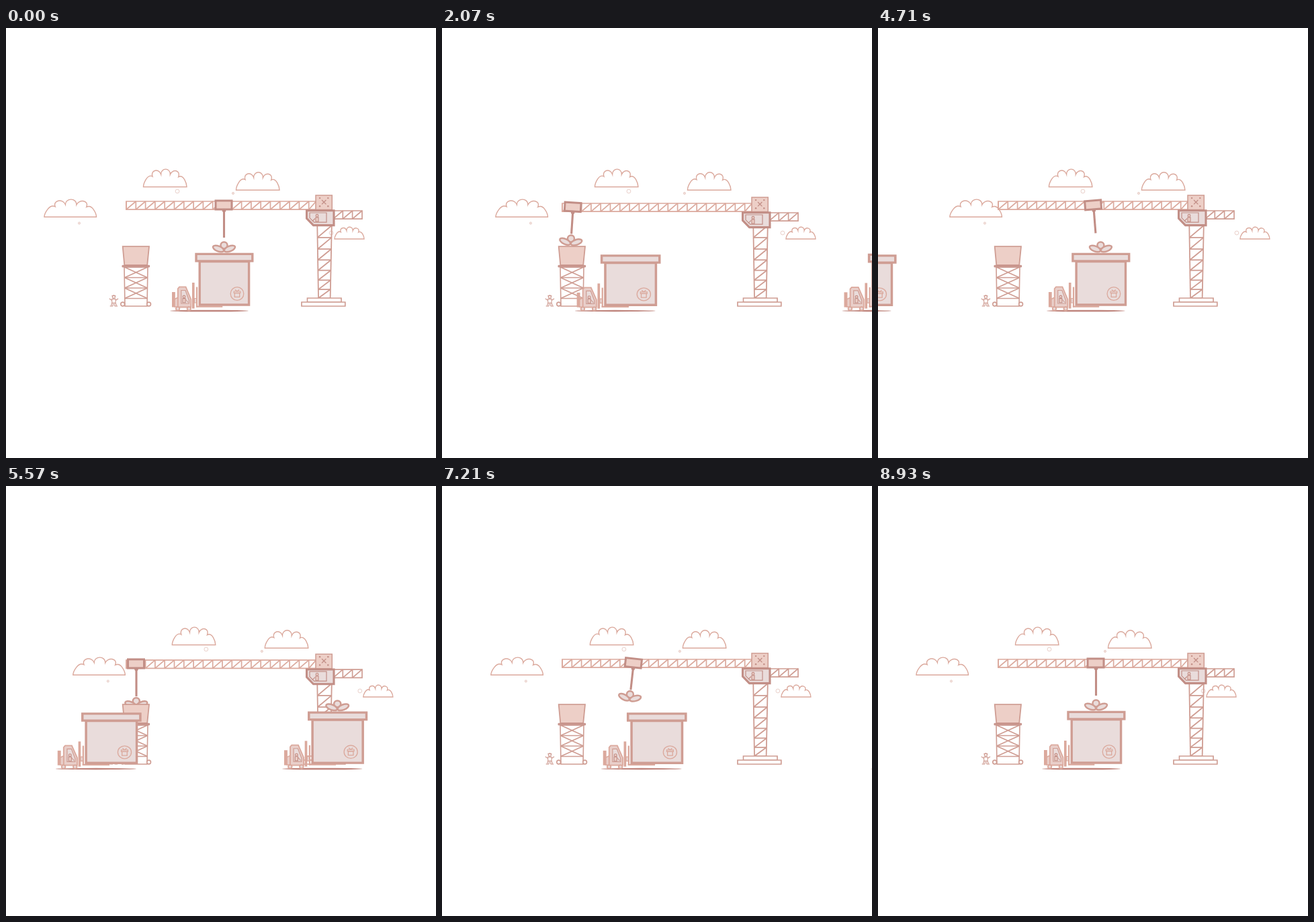
Animation, 640 px wide and 640 px high, one loop 9 s. Source, as an HTML page with a canvas:

```html
<!DOCTYPE html>
<html lang="en">
<head>
<meta charset="utf-8">
<title>Gift crane</title>
<style>
html, body { margin: 0; width: 100%; height: 100%; overflow: hidden; background: #fff; }
canvas { display: block; width: 100vmin; height: 100vmin; }
</style>
</head>
<body>
<canvas id="stage"></canvas>
<script>
const canvas = document.getElementById('stage');
const ctx = canvas.getContext('2d');

const LOOP = 9000, FPS = 14, CYCLE = 4476;
const HOME = 302.5, GROUND = 421, TRAVEL = 402;
const PICKUP = 193.5, DROP = 324, BOW_REST = 323.5, RELEASE = 3950;
const LIGHT = '#dba99d', MID = '#cf9d93', DARK = '#c28e86';
const PINK = '#edcfc7', PALE = '#e9dcdb';

// ---------- helpers ----------
const clamp = v => Math.max(0, Math.min(1, v));
const unit = (t, from, to) => clamp((t - from) / (to - from));
const ramp = (t, from, to) => (1 - Math.cos(Math.PI * unit(t, from, to))) / 2;
const mix = (a, b, u) => a + (b - a) * u;

// Symmetric cubic-bezier easing with handles at .35
function glide(u) {
  let lo = 0, hi = 1;
  for (let i = 0; i < 24; i++) {
    const s = (lo + hi) / 2, r = 1 - s;
    if (1.05 * s * r + s * s * s < u) lo = s; else hi = s;
  }
  return lo * lo * (3 - 2 * lo);
}

function paint(stroke, width, fill) {
  if (fill) { ctx.fillStyle = fill; ctx.fill(); }
  if (stroke) { ctx.strokeStyle = stroke; ctx.lineWidth = width; ctx.stroke(); }
}
function poly(points, stroke, width, fill) {
  ctx.beginPath();
  for (const [x, y] of points) ctx.lineTo(x, y);
  ctx.closePath();
  paint(stroke, width, fill);
}
function line(x1, y1, x2, y2, stroke, width) {
  ctx.beginPath();
  ctx.moveTo(x1, y1);
  ctx.lineTo(x2, y2);
  paint(stroke, width);
}
function box(x, y, w, h, stroke, width, fill) {
  ctx.beginPath();
  ctx.rect(x, y, w, h);
  paint(stroke, width, fill);
}
function dot(x, y, r, stroke, width, fill) {
  ctx.beginPath();
  ctx.arc(x, y, r, 0, 7);
  paint(stroke, width, fill);
}
function oval(x, y, rx, ry, turn, stroke, width, fill) {
  ctx.beginPath();
  ctx.ellipse(x, y, rx, ry, turn, 0, 7);
  paint(stroke, width, fill);
}

// ---------- scenery ----------
// Scallops between valleys that sit on a half ellipse
function cloud(x, base, w, h) {
  const point = (u, v) => [x + clamp(u) * w, base - v * h];
  const valley = a => [.5 - .5 * Math.cos(a), .72 * Math.sin(a)];
  let from = 0;
  ctx.beginPath();
  ctx.moveTo(x, base);
  for (let i = 0; i < 5; i++) {
    const to = i < 4 ? .95 + i * .43 : Math.PI;
    const mid = (from + to) / 2;
    const du = -.13 * Math.cos(mid), dv = .39 * Math.sin(mid);
    const [u1, v1] = valley(from), [u2, v2] = valley(to);
    ctx.bezierCurveTo(...point(u1 + du, v1 + dv), ...point(u2 + du, v2 + dv), ...point(u2, v2));
    from = to;
  }
  ctx.closePath();
  paint(LIGHT, 1.4);
}

function sky(t) {
  ctx.save();
  ctx.translate(25.2 * (1 - Math.cos(Math.PI * (t + 40) / CYCLE)), 0);
  cloud(57, 281.3, 77.5, 26.3);
  cloud(204.5, 236.5, 64.5, 26.5);
  cloud(342.5, 241.2, 64.5, 26.5);
  cloud(489, 314, 44, 17.8);
  for (const [x, y] of [[255, 243], [484, 305]]) dot(x, y, 2.9, '#ead0ca', 1);
  for (const [x, y] of [[338, 246], [109, 290.5]]) dot(x, y, 1.6, '#ead0ca', 1, '#f3e2de');
  ctx.restore();
}

function lattice(x1, x2, top, color) {
  const bottom = top + 12.2, step = 14.3;
  box(x1, top, x2 - x1, bottom - top, color, 1.7);
  for (let x = x1; x < x2 - 1; x += step) {
    line(x, top, x, bottom, color, 1.7);
    line(x, bottom, Math.min(x + step, x2), top, color, 1.7);
  }
}

function person(x, y) {
  dot(x, y, 1.9, DARK, 1.1, PINK);
  box(x - 2, y + 2.6, 4, 6.2, DARK, 1.1, PINK);
}

function mast() {
  const left = y => 463.3 + (y - 294) * .016;
  const right = y => 484.8 - (y - 294) * .02;
  line(left(290), 290, left(402), 402, MID, 1.8);
  line(right(290), 290, right(402), 402, MID, 1.8);
  for (let i = 0, y = 294; i < 7; i++) {
    const next = y + 17.9 - i * .82;
    line(left(next), next, right(next), next, MID, 1.8);
    line(left(next), next, right(y), y, MID, 1.8);
    y = next;
  }
  box(448.5, 402, 50.5, 6, MID, 1.7, '#fff');
  box(440, 408, 64.8, 6, MID, 1.7, '#fff');
}

function crane(bob) {
  mast();
  ctx.save();
  ctx.translate(0, bob);
  box(462, 285 - bob, 24, 7, null, 0, '#fff');
  lattice(179, 461.5, 258, LIGHT);
  lattice(487, 530, 272, MID);

  box(461, 249, 24.3, 21.5, MID, 1.5, PINK);
  for (const side of [-1, 1]) {
    line(473.2 - 3.2, 259.2 - 3.2 * side, 473.2 + 3.2, 259.2 + 3.2 * side, DARK, 1.3);
    for (const end of [-1, 1]) dot(473.2 + 6.1 * side, 259.2 + 6.1 * end, 1.2, null, 0, DARK);
  }

  poly([[447.5, 271.8], [488, 271.8], [488, 293.6], [457.5, 293.6], [447.5, 283.3]], DARK, 3.1, PALE);
  poly([[452, 275], [477, 275], [477, 289.2], [458.5, 289.2], [452, 282.6]], DARK, 1.2);
  person(463, 279.3);
  line(456, 287.5, 460, 283.5, DARK, 1.1);
  ctx.restore();
}

function bucketTower() {
  poly([[173.7, 325.2], [213, 325.2], [210.2, 353], [176.3, 353]], MID, 1.8, PINK);
  poly([[176, 356], [211, 356], [210, 414], [177, 414]], MID, 1.6);
  for (let i = 0; i < 3; i++) {
    const y = 356 + i * 15.5, next = y + 15.5;
    line(176.5, next, 210.5, next, MID, 1.6);
    line(176.5, y, 210.5, next, MID, 1.6);
    line(210.5, y, 176.5, next, MID, 1.6);
  }
  box(173, 353.3, 40.5, 2.5, DARK, 1, MID);
  for (const x of [173.7, 212.6]) dot(x, 411, 2.9, MID, 1.6, '#fff');
}

function worker() {
  const x = 160.4;
  dot(x, 400, 2.1, MID, 1.1, '#fff');
  line(x - 3, 398.6, x + 3, 398.6, MID, 1.2);
  for (const side of [-1, 1]) {
    line(x + side * 2.7, 405.6, x + side * 6.6, 402.8, MID, 1.2);
    line(x + side * 2.8, 409.6, x + side * 3.9, 413, MID, 1.2);
    line(x + side * .9, 410.5, x + side * 1.3, 413.5, MID, 1.2);
    line(x + side * 1.2, 413.9, x + side * 5.7, 413.9, MID, 1.2);
  }
  box(x - 2.7, 403.4, 5.4, 6, MID, 1.1, '#fff');
}

// ---------- moving parts ----------
function bow(x, y) {
  dot(x, y, 5, MID, 2.5, PALE);
  for (const side of [-1, 1])
    oval(x + side * 8.4, y + 5, 8.6, 3.9, -side * .38, MID, 2.5, PALE);
}

function giftBox() {
  box(288.2, 347.5, 73.4, 64.5, MID, 3.4, PALE);
  box(283, 336.4, 83.8, 10.5, MID, 3.4, PALE);
  dot(344, 395.5, 9.8, LIGHT, 1.3);
  box(340.3, 394.5, 7.4, 5.9, LIGHT, 1.3);
  box(339.2, 392, 9.6, 2.5, LIGHT, 1.2);
  for (const side of [-1, 1]) line(344, 392, 344 + side * 3, 389.4, LIGHT, 1.3);
}

function forklift() {
  const body = '#e9cfca';
  box(247, 393, 4.8, 22.5, null, 0, LIGHT);
  poly([[251, 403.5], [256, 401], [256, 415], [251, 415]], LIGHT, 1.5, body);
  poly([[255.8, 415.5], [255.8, 388], [258, 385.4], [267.6, 385.4], [275.4, 404], [275.4, 415.5]],
    LIGHT, 1.8, body);
  poly([[260.8, 390.5], [267, 390.5], [272.4, 405], [272.4, 410], [260.8, 410]], MID, 1.2, PALE);
  person(265, 400);
  line(267.5, 404, 271, 408.5, MID, 1.2);
  for (const x of [255.6, 272.3]) dot(x, 417.8, 2.7, LIGHT, 1.8, PALE);
  box(277, 379, 3.6, 38.5, null, 0, LIGHT);
  box(280.4, 402.5, 3.6, 6.5, LIGHT, 1.2, PALE);
  box(283, 385.5, 2.2, 30, null, 0, LIGHT);
  box(283, 413.4, 39.3, 2.4, null, 0, LIGHT);
}

function load(x, sx, sy, bowAlpha) {
  ctx.save();
  ctx.translate(x, GROUND);
  ctx.scale(sx, sy);
  ctx.translate(-HOME, -GROUND);
  oval(HOME, GROUND, 58.5, 1.25, 0, null, 0, '#bf857d');
  forklift();
  ctx.globalAlpha = bowAlpha;
  bow(324.5, BOW_REST);
  ctx.globalAlpha = 1;
  giftBox();
  ctx.restore();
}

// The trolley leans into its travel, more the faster it runs
function hoist(p, bob) {
  const out = unit(p, 150, 950), back = unit(p, 2000, 3170);
  const x = mix(DROP, PICKUP, ramp(out, 0, 1) - ramp(back, 0, 1));
  const lean = u => Math.pow(Math.abs(Math.sin(Math.PI * u)), .35);
  const tilt = .115 * (lean(back) - lean(out));
  const rope = 42 - 8.5 * (ramp(p, 0, 350) - ramp(p, 800, 1080)
    + ramp(p, 1450, 2000) - ramp(p, 3450, 3900));
  const y = 263.4 + bob;
  const held = p > 1080;

  if (!held) bow(PICKUP, mix(345, BOW_REST, ramp(p, 600, 1050)));
  ctx.save();
  ctx.translate(x, y);
  ctx.rotate(tilt);
  line(.5, 6, .5, 6.6 + rope, DARK, 3.1);
  dot(.5, 8, 2.8, null, 0, DARK);
  if (held && p < RELEASE) bow(.3, Math.min(BOW_REST - y, rope + 13.6));
  box(-12, -6.5, 24, 13, DARK, 3, PINK);
  ctx.restore();
}

function arriving(p) {
  const left = 1 - unit(p, 0, 3110);
  const squash = 1 - ramp(p, 2780, 3280);
  load(HOME - TRAVEL * left * left, 1 + .028 * squash, 1 - .03 * squash, p < RELEASE ? 0 : 1);
}

function departing(p) {
  const squash = ramp(p, 300, 1500);
  const fade = 1 - .4 * unit(p, 1120, 1290);
  load(HOME + TRAVEL * glide(unit(p, 0, 3150)), 1 + .03 * squash, 1 - .012 * squash, fade);
}

function draw(t) {
  const p = t % CYCLE;
  const bob = 5.6 * (ramp(p, 1000, 1320) - ramp(p, 1750, 2420)
    + ramp(p, 2850, 3530) - ramp(p, RELEASE, 4380));

  ctx.fillStyle = '#fff';
  ctx.fillRect(0, 0, 640, 640);
  sky(t);
  crane(bob);
  hoist(p, bob);
  bucketTower();
  worker();
  arriving(p);
  if (p < 3150) departing(p);
}

function resize() {
  const side = Math.min(innerWidth, innerHeight) * (devicePixelRatio || 1);
  canvas.width = canvas.height = Math.round(side);
}

function tick() {
  const now = (performance.now() + 5) % LOOP;
  const scale = canvas.width / 640;
  ctx.setTransform(scale, 0, 0, scale, 0, 0);
  draw(Math.floor(now * FPS / 1000) * 1000 / FPS);
  requestAnimationFrame(tick);
}

addEventListener('resize', resize);
resize();
tick();
</script>
</body>
</html>
```
